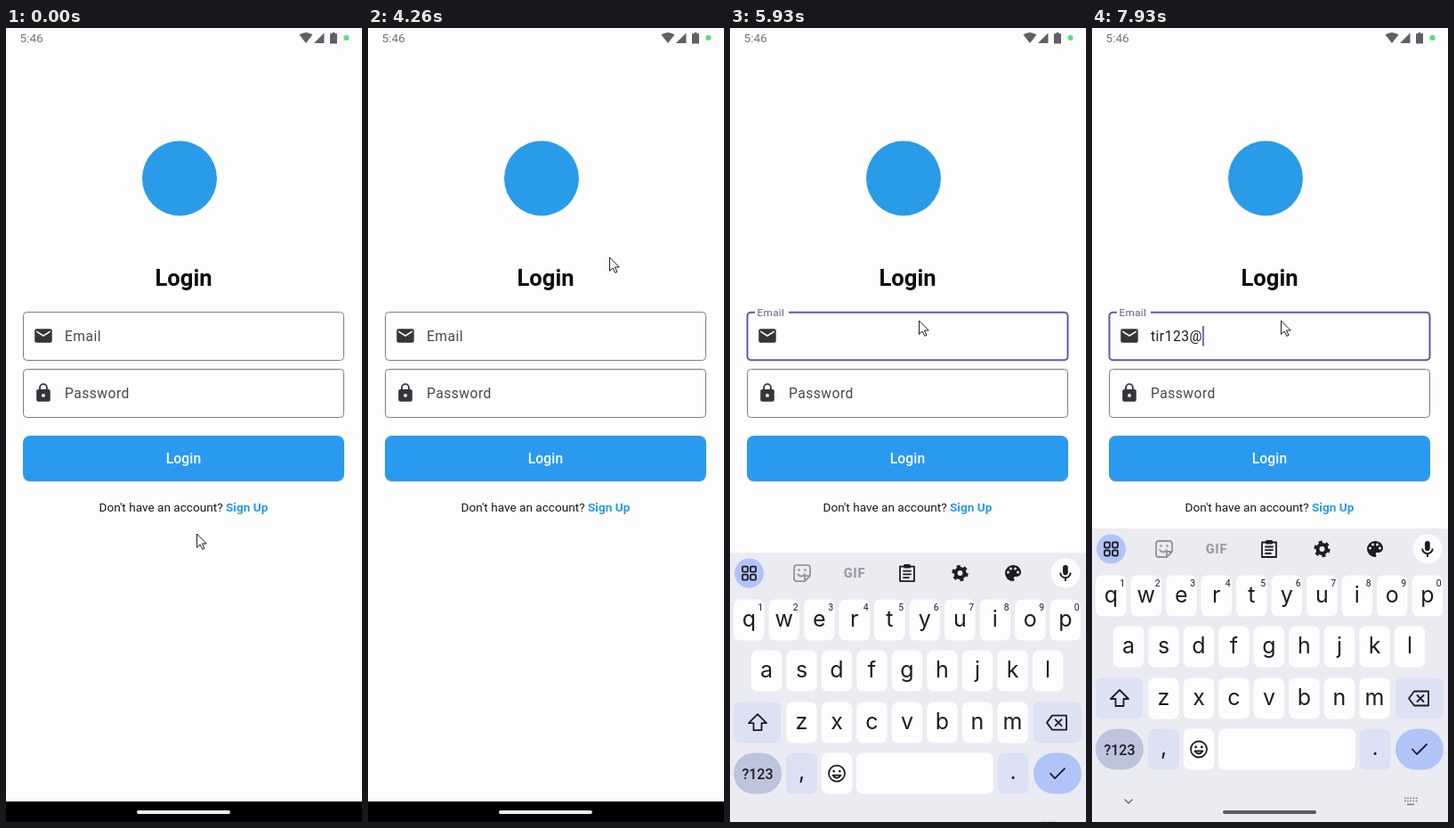
An HTML page for the animation above (8000 ms loop, 400x890 px).

```html
<!DOCTYPE html>
<html lang="en">
<head>
<meta charset="utf-8">
<title>Login screen</title>
<style>
html, body { margin: 0; width: 100%; height: 100%; overflow: hidden; background: #fefdfe; }
svg { display: block; width: 400px; height: 890px; }
text { font-family: Roboto, sans-serif; white-space: pre; }
.field { fill: none; stroke: #7f7b85; }
.body { font-size: 15.6px; letter-spacing: .49px; }
.mid { text-anchor: middle; }
.line { fill: none; stroke: #1d1c22; stroke-width: 1.8; stroke-linejoin: round; stroke-linecap: round; }
.key { font: 25px Inter, sans-serif; text-anchor: middle; }
.hint { font-size: 10.5px; text-anchor: middle; }
</style>
</head>
<body>
<svg id="stage" viewBox="0 0 400 890">
  <rect width="400" height="890" fill="#fefdfe"/>

  <!-- status bar -->
  <g fill="#605e66">
    <text x="15.5" y="16" font-size="13.6" fill="#74717a">5:46</text>
    <path d="M329.5 7.5Q337 2.5 344.5 7.5L337 17Z"/>
    <path d="M346 17H357.5V5.5Z"/>
    <path d="M366.5 5H369.5V6.3H372V17.5H364V6.3H366.5Z"/>
    <circle cx="382.5" cy="11" r="3" fill="#4be378"/>
  </g>

  <circle cx="195" cy="168.5" r="42" fill="#2a9be8"/>
  <text class="mid" x="199.5" y="289" font-size="25.6" font-weight="700" fill="#0c0c0e">Login</text>

  <!-- form -->
  <rect class="field" x="19.5" y="318.5" width="360" height="54" rx="4"/>
  <rect class="field" x="19.5" y="382.5" width="360" height="54" rx="4"/>
  <rect id="focus" x="19.5" y="318.8" width="360" height="53.5" rx="4" fill="none" stroke="#6a54a8" stroke-width="2"/>
  <rect id="gap" x="28" y="316" height="6" fill="#fefdfe"/>
  <g fill="#37343c">
    <path transform="translate(30.3 333.3) scale(.973)" d="M20 4H4c-1.1 0-2 .9-2 2v12c0 1.1.9 2 2 2h16c1.1 0 2-.9 2-2V6c0-1.1-.9-2-2-2zm0 4l-8 5-8-5V6l8 5 8-5z"/>
    <path transform="translate(30.3 397.3) scale(.973)" fill-rule="evenodd" d="M18 8h-1V6A5 5 0 0 0 7 6v2H6c-1.1 0-2 .9-2 2v10c0 1.1.9 2 2 2h12c1.1 0 2-.9 2-2V10c0-1.1-.9-2-2-2zM12 17a2 2 0 1 1 0-4 2 2 0 0 1 0 4zM15.1 8H8.9V6a3.1 3.1 0 0 1 6.2 0z"/>
  </g>
  <text id="label" class="body">Email</text>
  <text class="body" x="66" y="414.5" fill="#49454f">Password</text>
  <text id="typed" class="body" x="66" y="350.5" fill="#1d1b20"></text>
  <rect id="caret" y="334" width="1.7" height="22.5" fill="#6a54a8"/>

  <rect x="19" y="458" width="361" height="51" rx="8" fill="#cbd3dc"/>
  <rect x="19" y="457" width="361" height="51" rx="8" fill="#2a9af0"/>
  <text class="mid" x="199.5" y="488" font-size="15.6" font-weight="500" letter-spacing=".1" fill="#fff">Login</text>
  <text x="104.5" y="541.5" font-size="13.6" fill="#17161a">Don't have an account?</text>
  <text x="247" y="541.5" font-size="13.6" font-weight="700" fill="#2a98ea">Sign Up</text>

  <rect y="867" width="400" height="23"/>
  <rect x="147" y="877" width="105" height="4" rx="2" fill="#f0eff0"/>

  <g id="board"></g>
  <path id="mouse" d="M0 0V15.3L3.6 12L6.3 17.4L8.5 16.3L5.9 11H10.8Z" fill="#fefdfe" stroke="#1d1c22" stroke-linejoin="round"/>
</svg>
<script>
const LOOP = 8000, FOCUS = 5400, KEYS_UP = 5728;
const $ = id => document.getElementById(id);
const clamp = v => Math.min(1, Math.max(0, v));
const mix = (a, b, u) => a + (b - a) * u;

// Material standard curve: cubic-bezier(.4, 0, .2, 1)
function ease(x) {
  x = clamp(x);
  let lo = 0, hi = 1, s = x;
  for (let i = 0; i < 24; i++) {
    s = (lo + hi) / 2;
    const at = 1.2 * s * (1 - s) ** 2 + .6 * s * s * (1 - s) + s ** 3;
    if (at < x) lo = s; else hi = s;
  }
  return 3 * s * s * (1 - s) + s ** 3;
}

// time, x, y of the pointer
const path = [
  [2650, 214.5, 567], [2920, 222, 515], [3500, 271.5, 257],
  [4700, 271.5, 257], [5230, 212.5, 328]
];
// time, text in the field
const typing = [
  [0, ''], [6540, 't'], [6670, 'ti'], [6800, 'tir'],
  [7260, 'tir1'], [7460, 'tir12'], [7660, 'tir123'], [7860, 'tir123@']
];

const rect = (x, y, w, h, r, fill) =>
  `<rect x="${x}" y="${y}" width="${w}" height="${h}" rx="${r}" fill="${fill}"/>`;
const at = (x, y, inner) => `<g transform="translate(${x} ${y})">${inner}</g>`;
const line = (d, more = '') => `<path class="line" d="${d}" ${more}/>`;

function buildBoard() {
  const WHITE = '#fefdfe', SOFT = '#dde1f4', BLUE = '#b1c4f7', BG = '#ebebf2', INK = '#1d1c22';
  const rowY = [636.5, 693.5, 751.5, 808.5], top = 584;
  let s = rect(0, 561, 400, 330, 0, BG);

  const cap = (x, w, row, fill, r = 7) => rect(x, rowY[row] - 23, w, 46, r, fill);
  const letters = (word, x0, row) => [...word].forEach((c, i) => {
    const x = x0 + i * 39.5;
    s += cap(x - 17.2, 34.4, row, WHITE) + `<text class="key" x="${x}" y="${rowY[row] + 7}">${c}</text>`;
    if (!row) s += `<text class="hint" x="${x + 13}" y="626">${(i + 1) % 10}</text>`;
  });
  letters('qwertyuiop', 21.3, 0);
  letters('asdfghjkl', 41, 1);
  letters('zxcvbnm', 80.5, 2);

  s += cap(4, 53, 2, SOFT) + cap(341, 54, 2, SOFT);
  s += at(31, 751.5, line('M0-9.5L-10 .5H-4.5V8.5H4.5V.5H10Z'));
  s += at(367, 751.5, line('M-11 0L-5-8H11V8H-5ZM-1.5-3.5L5.5 3.5M5.5-3.5L-1.5 3.5'));

  s += cap(4, 54, 3, '#bcc5dc', 23) + cap(63, 35, 3, SOFT) + cap(103, 34.4, 3, WHITE) +
    cap(142, 154, 3, WHITE) + cap(301, 34.4, 3, SOFT) + cap(341, 54, 3, BLUE, 23);
  s += '<text class="mid" x="31" y="814.5" font-size="16" font-weight="500">?123</text>' +
    '<text class="key" x="80.5" y="815" font-size="20">,</text>' +
    '<text class="key" x="318" y="815" font-size="20">.</text>';
  s += at(120, 808.5, '<circle class="line" r="9"/><circle cx="-3.3" cy="-2.5" r="1.4"/>' +
    '<circle cx="3.3" cy="-2.5" r="1.4"/>' + line('M-4.5 2Q0 8 4.5 2Z'));
  s += at(368, 808.5, line('M-8 0L-3 5.5L8-5.5'));

  // ends of the top strip
  let grid = `<circle r="16.5" fill="${BLUE}"/>`;
  for (const x of [-7.5, 1.5]) for (const y of [-7.5, 1.5])
    grid += `<rect class="line" x="${x}" y="${y}" width="6" height="6" rx="1.2"/>`;
  s += at(21.5, top, grid);
  s += at(377, top, `<circle r="16.5" fill="${WHITE}"/>` +
    '<path transform="translate(-11.5 -11) scale(.95)" d="M12 14c1.66 0 3-1.34 3-3V5a3 3 0 0 0-6 0v6c0 1.66 1.34 3 3 3zm5-3a5 5 0 0 1-10 0H5c0 3.53 2.61 6.43 6 6.92V21h2v-3.08c3.39-.49 6-3.39 6-6.92z"/>');

  // tool icons
  let tools = at(81, top, '<g opacity=".42">' + line('M-6-9H6Q9-9 9-6V3L3 9H-6Q-9 9-9 6V-6Q-9-9-6-9ZM9 3H3V9M-5 1Q-1 6 3 1') +
    '<circle cx="-3.5" cy="-3.5" r="1.3"/><circle cx="3.5" cy="-3.5" r="1.3"/></g>');
  tools += `<text class="mid" x="140" y="${top + 5}" font-size="14.5" font-weight="900" letter-spacing=".8" fill="#9f9ea6">GIF</text>`;
  tools += at(199, top, line('M-8-7.5H8V9H-8ZM-4-2.5H4M-4 1.2H4M-4 5H2') + rect(-4, -10, 8, 4.5, 1.5, INK));
  tools += at(258.5, top, `<g fill="none" stroke="${INK}"><circle r="5" stroke-width="4"/>` +
    '<circle r="7.8" stroke-width="2.8" stroke-dasharray="4.084"/></g>');
  tools += at(318, top, '<path transform="translate(-12 -12)" d="M12 3a9 9 0 0 0 0 18c.83 0 1.5-.67 1.5-1.5 0-.39-.15-.74-.39-1-.23-.27-.38-.62-.38-1 0-.83.67-1.5 1.5-1.5H16c2.76 0 5-2.24 5-5 0-4.42-4.03-8-9-8z"/>' +
    [[-5.5, -1], [-2.5, -5], [2.5, -5], [5.5, -1]].map(p => `<circle cx="${p[0]}" cy="${p[1]}" r="1.5" fill="${BG}"/>`).join(''));
  s += `<g id="tools">${tools}</g>`;

  s += '<g id="hints"><text class="mid" x="92" y="590" font-size="15.3">tir1</text>' +
    '<rect x="142" y="572" width="1" height="23" fill="#cbcbd4"/>' +
    '<text class="mid" x="198.5" y="578.5" font-size="15">tir123</text>' +
    '<text class="mid" x="198.5" y="599" font-size="12.2" fill="#47464e">@post.test</text></g>';

  // navigation strip
  s += at(41, 867, line('M-4-2L0 2L4-2', 'style="stroke:#66656e;stroke-width:1.4"'));
  for (let i = 0; i < 10; i++)
    s += rect(351 + i % 5 * 3.2, 862.5 + (i / 5 | 0) * 3.2, 1.6, 1.6, 0, '#7d7c86');
  s += rect(354, 869.5, 8, 1.6, 0, '#7d7c86') + rect(147, 877, 105, 4, 2, '#5a5962');
  $('board').innerHTML = `<g fill="${INK}">${s}</g>`;
}

function pointer(t) {
  let i = 0;
  while (i < path.length - 2 && t >= path[i + 1][0]) i++;
  const [t0, x0, y0] = path[i], [t1, x1, y1] = path[i + 1];
  let u = clamp((t - t0) / (t1 - t0));
  u = i === 0 ? u * u : i === 1 ? 1 - (1 - u) ** 2 : u * u * (3 - 2 * u);
  return [mix(x0, x1, u), mix(y0, y1, u)];
}

let shown = null, width = 0;

function draw(t) {
  const [px, py] = pointer(t);
  $('mouse').setAttribute('transform', `translate(${px} ${py})`);

  const f = ease((t - FOCUS) / 167);
  $('focus').setAttribute('opacity', f);
  $('gap').setAttribute('width', 38 * f);
  $('label').setAttribute('transform',
    `translate(${mix(66, 30.5, f)} ${mix(350.5, 323, f)}) scale(${mix(1, .75, f)})`);
  $('label').setAttribute('fill', f < .5 ? '#49454f' : '#6a5f86');

  const up = ease((t - KEYS_UP) / 307);
  $('board').setAttribute('transform', `translate(0 ${329 * (1 - up)})`);
  $('board').setAttribute('visibility', up > 0 ? 'visible' : 'hidden');

  const [since, word] = typing.filter(k => k[0] <= t).pop();
  if (word !== shown) {
    $('typed').textContent = shown = word;
    width = word ? $('typed').getComputedTextLength() : 0;
  }
  const suggest = word !== '' && !word.includes('@');
  $('tools').setAttribute('display', suggest ? 'none' : 'inline');
  $('hints').setAttribute('display', suggest ? 'inline' : 'none');

  const lit = t >= FOCUS && (t - Math.max(since, FOCUS)) % 1000 < 500;
  $('caret').setAttribute('x', 66.2 + width);
  $('caret').setAttribute('opacity', lit ? 1 : 0);
}

buildBoard();
const start = performance.now();
function tick() {
  draw((performance.now() - start) % LOOP);
  requestAnimationFrame(tick);
}
tick();
</script>
</body>
</html>
```
